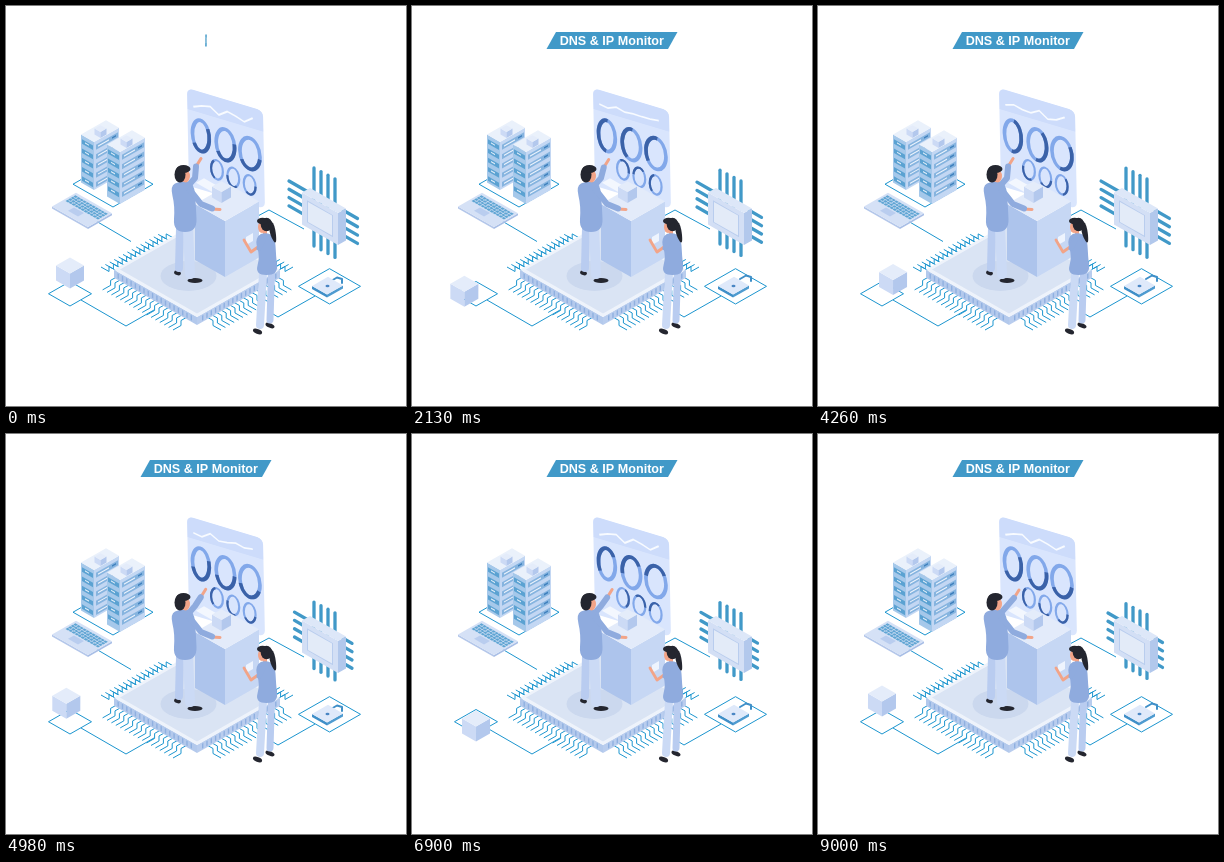
Animation of 400x400 px, one loop 9030 ms. Source, as an HTML page with a canvas:

```html
<!DOCTYPE html>
<html lang="en">
<head>
<meta charset="utf-8">
<title>DNS &amp; IP Monitor</title>
<style>
html, body { margin: 0; width: 100%; height: 100%; overflow: hidden; background: #fff; }
canvas { display: block; width: 400px; height: 400px; }
</style>
</head>
<body>
<canvas id="stage"></canvas>
<script>
const canvas = document.getElementById('stage');
const ctx = canvas.getContext('2d');
const dpr = window.devicePixelRatio || 1;
canvas.width = canvas.height = 400 * dpr;

const LOOP = 9030, INTRO = 600, TURN = 4200, TAU = Math.PI * 2;
const S = .57; // slope of the isometric axes
const TEAL = '#1b95cf', PIN = '#4199c8', DARK = '#3b62a8', RING = '#82a8ea';
const SKIN = '#f2a488', HAIR = '#24262f', SHIRT = '#8fabde', PANTS = '#cbdaf5', SHADE = '#b9ccf0';
const PALE = ['#e4ecfa', '#ccdaf5', '#b3c8ed'];

const clamp = x => Math.max(0, Math.min(1, x));
const mix = (a, b, k) => a + (b - a) * k;
const smooth = x => { x = clamp(x); return x * x * (3 - 2 * x); };
const each = (n, fn) => { for (let i = 0; i < n; i++) fn(i); };

function fill(color) {
  ctx.fillStyle = color;
  ctx.fill();
}
function trace(pts) {
  ctx.beginPath();
  each(pts.length / 2, i => ctx.lineTo(pts[2 * i], pts[2 * i + 1]));
}
function line(color, width, ...pts) {
  trace(pts);
  ctx.strokeStyle = color;
  ctx.lineWidth = width;
  ctx.stroke();
}
function limb(color, width, ...pts) {
  ctx.lineCap = ctx.lineJoin = 'round';
  line(color, width, ...pts);
  ctx.lineCap = 'butt';
  ctx.lineJoin = 'miter';
}
function oval(color, x, y, rx, ry, turn = 0) {
  ctx.beginPath();
  ctx.ellipse(x, y, rx, ry, turn, 0, TAU);
  fill(color);
}
// Rounded closed shape guided by a few points
function blob(color, ...pts) {
  const n = pts.length / 2, at = i => [pts[i % n * 2], pts[i % n * 2 + 1]];
  ctx.beginPath();
  each(n + 1, i => {
    const [x, y] = at(i), [u, v] = at(i + 1);
    if (i) ctx.quadraticCurveTo(x, y, (x + u) / 2, (y + v) / 2);
    else ctx.moveTo((x + u) / 2, (y + v) / 2);
  });
  fill(color);
}

// Floor tile from its near corner, a to the left and b to the right
function floor(x, y, a, b) {
  trace([x, y, x - a, y - a * S, x - a + b, y - (a + b) * S, x + b, y - b * S]);
  ctx.closePath();
}
function tile(color, x, y, a, b) {
  floor(x, y, a, b);
  fill(color);
}
function frame(x, y, a) {
  floor(x, y, a, a);
  ctx.strokeStyle = TEAL;
  ctx.lineWidth = 1;
  ctx.stroke();
}
// Patch on an upright face that runs from a near corner to one side
function wall(color, side, x, y, u, v, w, h) {
  const px = x + side * u, py = y - u * S + v, qx = px + side * w, qy = py - w * S;
  trace([px, py, qx, qy, qx, qy + h, px, py + h]);
  fill(color);
}
function block(x, y, a, b, h, [top, left, right] = PALE) {
  wall(left, -1, x, y, 0, 0, a, h);
  wall(right, 1, x, y, 0, 0, b, h);
  tile(top, x, y, a, b);
}

function leads() {
  const lead = (x, y, dx, dy) => line(TEAL, 1, x, y, x + dx, y + dy,
    x + dx, y + dy + 5, x + 2 * dx, y + 2 * dy + 5);
  for (const side of [-1, 1]) {
    each(17, i => lead(191 + side * (8 + i * 4.4), 310 - i * 4.4 * S, side * 8, 4.5));
    each(14, i => lead(191 + side * (80 - i * 4.4), 265 - i * 4.4 * S, side * 8, -4.5));
  }
}

function platform() {
  leads();
  block(191, 311, 83, 83, 8, ['#eef3fb', '#b3c9ec', '#b9cdee']);
  tile('#dae4f4', 191, 307.5, 77, 77);
  for (const side of [-1, 1])
    each(18, i => wall('#8fb0e0', side, 191, 311, 5 + i * 4.3, 1.5, 1.4, 5));
  oval('#cbd8ee', 182.5, 270, 28, 15);
}

function wires() {
  line(TEAL, 1, 90, 215, 125, 235.5);
  line(TEAL, 1, 75, 294, 120, 320, 148, 304);
  line(TEAL, 1, 250, 211, 263, 204, 298, 223);
  line(TEAL, 1, 309, 290, 272, 311, 262, 305);
  frame(107, 201, 40);
  frame(64, 300, 21.5);
  frame(323.5, 298, 31);
}

function tower(x, y, h) {
  block(x, y, 13, 25, h, ['#eaf1fb', '#a5c8ea', '#c3d7f3']);
  each(5, i => {
    const v = 4 + i * 9.3;
    wall('#5ba2d2', -1, x, y, 1, v, 11, 4.5);
    wall('#e3effa', -1, x, y, 5, v + 1.5, 4, 1.2);
    wall('#86b4df', 1, x, y, 2, v, 22, 5);
    wall('#eef4fd', 1, x, y, 4, v + 1.8, 11, 1.2);
    wall('#3e7fbd', 1, x, y, 18, v + 1.5, 4, 1.6);
  });
  block(x + 6.5, y - 10, 6, 6, 6);
}

function laptop() {
  block(82, 221, 36, 24, 2, ['#d5e1f6', '#b4c7ea', '#a8bee6']);
  each(4, r => each(11, c =>
    tile('#5fa5d3', 92 - c * 3 + r * 2.6, 213.5 - (c * 3 + r * 2.6) * S, 2.5, 2.1)));
  tile('#b9cdef', 72, 210.5, 10, 6);
}

function ring(x, y, rx, ry, width, share, turn) {
  ctx.lineWidth = width;
  for (const [color, from, part] of [[RING, 0, 1], [DARK, turn, share]]) {
    ctx.beginPath();
    ctx.ellipse(x, y, rx, ry, 0, from, from + part * TAU);
    ctx.strokeStyle = color;
    ctx.stroke();
  }
}

function panel(t, spin) {
  const busy = smooth((t - 960) / 300) * smooth((6600 - t) / 300)
    + smooth((t - 7530) / 200) * smooth((8430 - t) / 200);
  ctx.save();
  ctx.transform(1, .3, .02, 1, 181, 82);
  ctx.beginPath();
  ctx.roundRect(0, 0, 76, 98, 6);
  fill('#d9e5fd');
  ctx.save();
  ctx.clip();
  ctx.fillStyle = '#cddcfb';
  ctx.fillRect(0, 0, 76, 21);
  ctx.restore();
  const pts = [];
  each(8, i => pts.push(6 + i * 8.5,
    14 + 3.5 * Math.sin(i * 2.3 + 1) + busy * 3 * Math.sin(t / 420 + i * 2.1)));
  line('#f8fbff', 1.7, ...pts);
  each(3, i => {
    ring(13 + 24.5 * i, 44 + 1.5 * i, 8.4 + i * .8, 15.5, 3.7, .5 - i * .06, spin - .6 + i * .4);
    ring(28.5 + 16.3 * i, 73.3 + 2.6 * i, 5.9, 9.6, 2.2, .35, spin + 2 - i);
  });
  ctx.restore();
}

function desk() {
  block(219, 215, 30, 34, 56, ['#e3ebfa', '#adc4ec', '#c6d7f4']);
  tile('#f3f7fe', 208, 187, 18, 8);
  block(215.5, 186, 9.5, 9.5, 11);
}

function man(reach) {
  const hx = mix(201, 195, reach), hy = mix(156, 152.5, reach);
  oval(HAIR, 171.5, 267, 3.5, 2.2, .3);
  oval(HAIR, 189, 274.5, 7.5, 2.4);
  limb(SHADE, 8, 174, 222, 173, 262);
  limb(PANTS, 10, 182, 222, 184, 268);
  limb(SKIN, 3, hx - 5, hy + 8, hx, hy);
  limb(SHIRT, 6, 182, 180, 189, 172, hx - 5, hy + 8);
  limb(SKIN, 5, 178, 172, 177, 178);
  blob(SHIRT, 174, 175, 164, 180, 169, 200, 167, 226, 191, 226, 190, 200, 188, 176);
  limb(SKIN, 3, 206, 203, 214, 203.5);
  limb(SHIRT, 6, 184, 184, 195, 198, 206, 202.5);
  oval(SKIN, 179.5, 170, 4.5, 6.5);
  oval(HAIR, 174, 168.5, 5.5, 8);
  oval(HAIR, 177.5, 163, 7, 4);
}

function woman() {
  oval(HAIR, 251.5, 325.5, 4.8, 2.4, .35);
  oval(HAIR, 264, 319.5, 4.8, 2.2, .4);
  limb(SHADE, 7, 265.5, 266, 264, 314);
  limb(PANTS, 8, 257, 267, 254, 319);
  wall('#eef4fe', 1, 240, 231, 0, 0, 7, 8);
  limb(SKIN, 2.8, 238, 234, 245, 246, 252, 241);
  limb(SKIN, 4, 259, 222, 259, 230);
  blob(SHIRT, 255, 226, 249, 235, 254, 250, 249, 269, 272, 269, 270, 250, 269, 229);
  limb(SHIRT, 5, 257, 234, 253, 242);
  oval(SKIN, 256, 221, 4, 6);
  oval(HAIR, 260.5, 218.5, 5.8, 6.8);
  oval(HAIR, 256.5, 215, 5.5, 3.2);
  blob(HAIR, 262, 213, 269, 218, 271, 240, 264, 230);
}

function chip(reach) {
  const k = (1 - reach) * 7;
  each(4, i => {
    const x = 308 + i * 7, y = 175 + i * 8.3;
    limb(PIN, 3.3, x, 162 + i * 3.6 + k * 1.1, x, 194 + i * 3);
    limb(PIN, 3.3, x, 215 + i * 3, x, 240 + i * 3.8 - k);
    limb(PIN, 3.3, 283 + k, y + k * S, 303, y + 11.5);
    limb(PIN, 3.3, 328, y + 24, 351.5 - k, y + 37.5 - k * S);
  });
  block(332, 207, 36, 8, 32, ['#dde7f8', '#d3dff5', '#b2c8ec']);
  wall('#b9cdee', -1, 332, 207, 5, 5, 26, 22);
  wall('#e3ebf8', -1, 332, 207, 6, 6, 24, 20);
}

function lock(open) {
  const x = open * 3, y = -open * 2;
  limb('#3f8fc8', 2, 325 + x, 275 + y, 331 + x, 271.5 + y, 336 + x, 273 + y, 336 + x, 277 + y);
  block(321, 288.5, 15, 16, 3, ['#dfe9fa', '#3f8fc8', '#4f9bd0']);
  oval('#4a86c4', 321.5, 280, 2, 1.2);
}

// The box slides along the four sides of its tile
function slider(u) {
  const a = u % 4, x = 64 - 21.5 * (1 - Math.abs(a - 1)) * (a < 2)
    + 21.5 * (1 - Math.abs(a - 3)) * (a >= 2);
  block(x, 267.5 + 12.5 * (2 - Math.abs(a - 2)), 14, 14, 15);
}

function banner(t) {
  const k = 1 - Math.pow(1 - clamp((t - 30) / INTRO), 3);
  ctx.save();
  ctx.translate(200, 34.5);
  ctx.scale(mix(.012, 1, k), mix(.7, 1, k));
  trace([-56, -8.5, 65.5, -8.5, 56, 8.5, -65.5, 8.5]);
  fill(PIN);
  ctx.fillStyle = '#fff';
  ctx.font = 'bold 12.6px "Liberation Sans", Arial, sans-serif';
  ctx.textAlign = 'center';
  ctx.fillText('DNS & IP Monitor', -.2, 4.1);
  ctx.restore();
}

function draw(t) {
  const run = Math.max(0, t - INTRO), turns = run / TURN;
  const reach = .5 + .5 * Math.cos(turns * 4.5 * Math.PI);
  const open = turns >= 2 ? 1 : smooth((turns % 1 - .22) / .12);

  ctx.setTransform(dpr, 0, 0, dpr, 0, 0);
  ctx.fillStyle = '#fff';
  ctx.fillRect(0, 0, 400, 400);
  wires();
  tower(88, 136, 48);
  tower(114, 146, 52);
  laptop();
  platform();
  panel(t, turns * TAU);
  desk();
  man(reach);
  woman();
  chip(reach);
  lock(open);
  slider(turns * 4);
  banner(t);
}

const start = performance.now();
function tick() {
  draw((performance.now() - start) % LOOP);
  requestAnimationFrame(tick);
}
tick();
</script>
</body>
</html>
```
